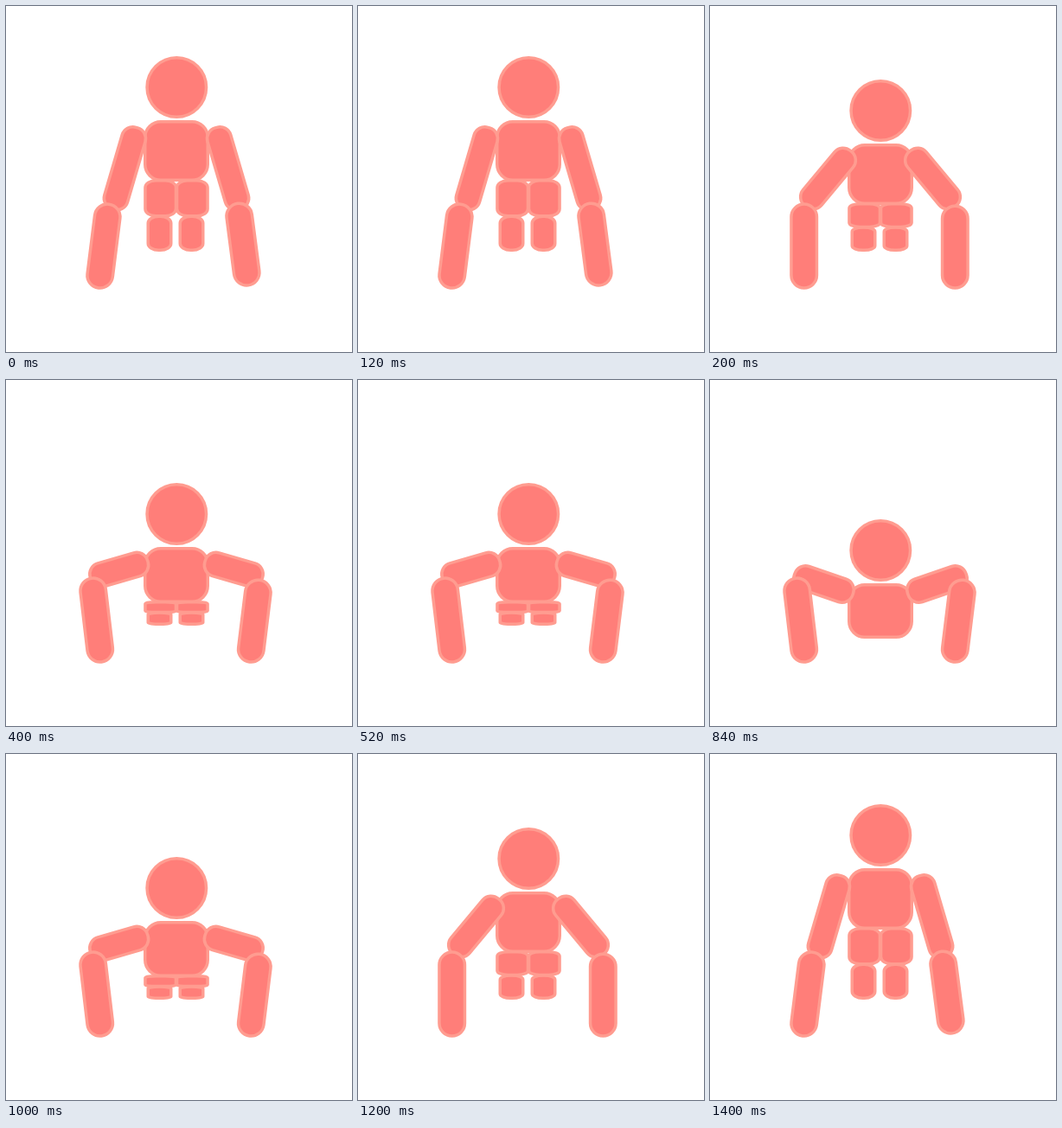
Recreate the animation shown at these times as an HTML page with a canvas. Size 400 px wide and 400 px high, loop 1.6 s.

```html
<!DOCTYPE html>
<html lang="en">
<head>
<meta charset="utf-8">
<title>Push-up</title>
<style>
html, body { margin: 0; width: 100%; height: 100%; overflow: hidden; background: #fff; }
canvas { display: block; }
</style>
</head>
<body>
<canvas id="stage" width="400" height="400"></canvas>
<script>
const ctx = document.getElementById('stage').getContext('2d');
const LINE = 3.5, STEP = 200;
const MID = 197, HAND = 311.3, FOOT = 284;

// Key poses from raised to lowered.
// top, height: torso; spread, drop: shoulders from its top centre;
// elbow: height of the elbow; lean: how far the forearm tips outwards
const POSES = [
  { top: 132, height: 71, spread: 49.7, drop: 22, elbow: 221.5, lean: -8.5 },
  { top: 159, height: 71, spread: 43, drop: 19.5, elbow: 220.5, lean: 0 },
  { top: 193, height: 65, spread: 46.5, drop: 20.5, elbow: 225, lean: 8 },
  { top: 235, height: 64, spread: 45, drop: 8, elbow: 229, lean: 8 }
];

// The right hand slides inwards when the body is raised
const ARMS = [
  { side: -1, reach: 88.3, forearm: 67.5, slide: 0 },
  { side: 1, reach: 86.3, forearm: 65.3, slide: 0.6 }
];

// Rounded box given by its centre and outer half sizes
function box(x, y, w, h, rx, ry = rx) {
  const inset = LINE / 2;
  ctx.beginPath();
  ctx.roundRect(x - w + inset, y - h + inset, 2 * w - LINE, 2 * h - LINE,
    { x: rx - inset, y: Math.max(0, ry - inset) });
  ctx.fill();
  ctx.stroke();
}

function limb(x1, y1, x2, y2, half, corner) {
  ctx.save();
  ctx.translate((x1 + x2) / 2, (y1 + y2) / 2);
  ctx.rotate(Math.atan2(y2 - y1, x2 - x1));
  box(0, 0, Math.hypot(x2 - x1, y2 - y1) / 2 + half, half, corner);
  ctx.restore();
}

// Pair of leg segments between two heights
function pair(mid, gap, top, bottom, half) {
  const h = (bottom - top) / 2;
  for (const side of [-1, 1]) box(mid + side * gap, top + h, half, h, 14, h * 0.45);
}

function legs(hip) {
  if (hip >= FOOT) return;
  const knee = hip + (FOOT - hip) * 0.53;
  pair(MID - 1, 18.5, knee - 3, FOOT, 15);
  pair(MID, 18.3, hip, knee, 19.5);
}

function arm({ side, reach, forearm, slide }, { top, spread, drop, elbow, lean }) {
  const shift = slide * Math.min(0, lean);
  const handX = MID + side * (reach + shift), handY = HAND + shift * 0.6;
  limb(MID + side * spread, top + drop, MID + side * (78 + lean), elbow, 15.7, 14.7);
  limb(handX + side * lean, handY - forearm, handX, handY, 16.5, 16.5);
}

function draw(pose) {
  const { top, height } = pose;
  ctx.clearRect(0, 0, 400, 400);
  ctx.fillStyle = '#ff7e79';
  ctx.strokeStyle = '#ff9c90';
  ctx.lineWidth = LINE;
  legs(top + height - 3);
  box(MID, top + height / 2, 38, height / 2, 20);
  box(MID + 0.3, top - 38, 36, 36, 36);
  for (const a of ARMS) arm(a, pose);
}

// Down through the poses, then back up
function tick() {
  const step = Math.floor(performance.now() / STEP) % 8;
  draw(POSES[Math.min(step, 7 - step)]);
  requestAnimationFrame(tick);
}
tick();
</script>
</body>
</html>
```
